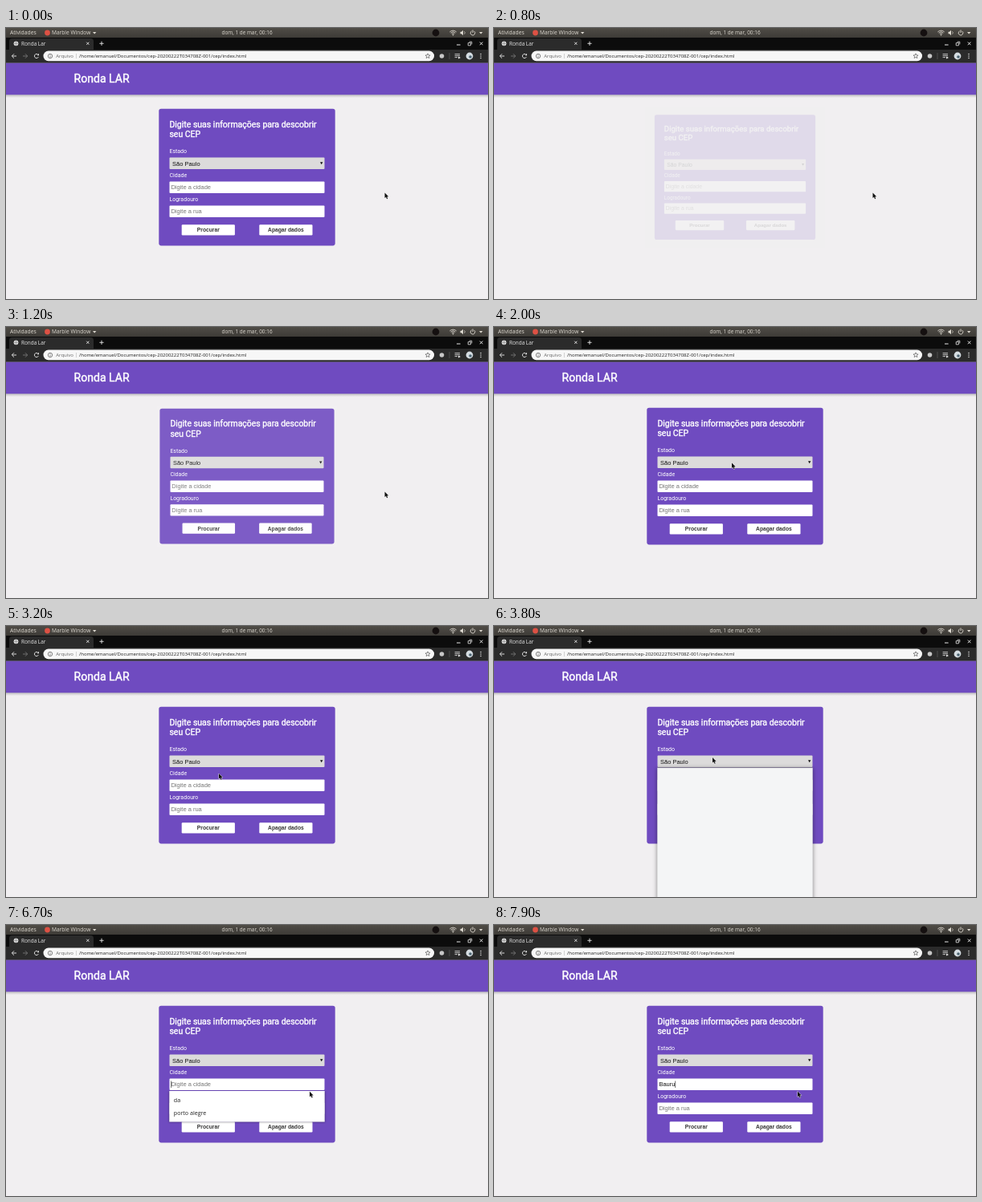
Write an HTML page with a canvas that moves like this. It is 600 by 338 pixels and loops after 8000 ms.

```html
<!DOCTYPE html>
<html lang="pt-BR">
<head>
<meta charset="utf-8">
<title>Ronda Lar</title>
<style>
html, body { margin: 0; width: 100%; height: 100%; overflow: hidden; background: #f1eff1; }
canvas { display: block; width: 600px; height: 338px; }
</style>
</head>
<body>
<canvas id="stage"></canvas>
<script>
const W = 600, H = 338, LOOP = 8000, STEP = 100;
const PURPLE = '#6f4bc0', PAGE = '#f1eff1', BAR = '#2b2b2b';
const UI = '"Open Sans", "Noto Sans", sans-serif';
const WEB = 'Roboto, sans-serif';
const FIELD = '"Liberation Sans", Arial, sans-serif';

const canvas = document.getElementById('stage');
const ctx = canvas.getContext('2d');
const dpr = window.devicePixelRatio || 1;
canvas.width = W * dpr;
canvas.height = H * dpr;

// [time, x, y] of the pointer tip
const pointerPath = [
  [1600, 471.5, 205.5], [1700, 440, 201], [1800, 378, 189], [1900, 322, 175], [2000, 296, 169.5],
  [2600, 296, 169.5], [3000, 272.5, 174],
  [3100, 272.5, 174], [3300, 257.5, 194], [3400, 273, 168],
  [3500, 273, 168], [3600, 272, 164],
  [4900, 272, 164], [5300, 378, 200],
  [5400, 378, 200], [5700, 378, 207.7]
];

const clamp = v => Math.max(0, Math.min(1, v));
const ramp = (t, from, to) => clamp((t - from) / (to - from));

// CSS "ease": cubic-bezier(.25, .1, .25, 1)
function ease(x) {
  if (x <= 0 || x >= 1) return clamp(x);
  const curve = (s, a, b) => 3 * (1 - s) * (1 - s) * s * a + 3 * (1 - s) * s * s * b + s * s * s;
  let lo = 0, hi = 1;
  for (let i = 0; i < 24; i++) {
    const mid = (lo + hi) / 2;
    if (curve(mid, 0.25, 0.25) < x) lo = mid; else hi = mid;
  }
  return curve(lo, 0.1, 1);
}

function pointerAt(t) {
  let prev = pointerPath[0];
  for (const next of pointerPath) {
    if (t <= next[0]) {
      const k = next === prev ? 0 : ramp(t, prev[0], next[0]);
      return [prev[1] + (next[1] - prev[1]) * k, prev[2] + (next[2] - prev[2]) * k];
    }
    prev = next;
  }
  return prev.slice(1);
}

function box(x, y, w, h, fill, radius = 0) {
  ctx.fillStyle = fill;
  ctx.beginPath();
  ctx.roundRect(x, y, w, h, radius);
  ctx.fill();
}

function dot(x, y, r, fill) {
  ctx.fillStyle = fill;
  ctx.beginPath();
  ctx.arc(x, y, r, 0, 7);
  ctx.fill();
}

function ring(x, y, r, color, width = 0.7, from = 0, to = Math.PI * 2) {
  ctx.strokeStyle = color;
  ctx.lineWidth = width;
  ctx.beginPath();
  ctx.arc(x, y, r, from, to);
  ctx.stroke();
}

function trace(points) {
  ctx.beginPath();
  for (let i = 0; i < points.length; i += 2) ctx.lineTo(points[i], points[i + 1]);
}

function line(color, width, ...points) {
  ctx.strokeStyle = color;
  ctx.lineWidth = width;
  trace(points);
  ctx.stroke();
}

function poly(fill, ...points) {
  ctx.fillStyle = fill;
  trace(points);
  ctx.closePath();
  ctx.fill();
}

function text(str, x, y, size, family, fill, { weight = 400, align = 'left', embolden = 0 } = {}) {
  ctx.font = `${weight} ${size}px ${family}`;
  ctx.textAlign = align;
  ctx.fillStyle = fill;
  ctx.fillText(str, x, y);
  if (embolden) {
    ctx.strokeStyle = fill;
    ctx.lineWidth = embolden;
    ctx.lineJoin = 'round';
    ctx.strokeText(str, x, y);
  }
}

function cross(x, y, r, color, width = 0.9) {
  line(color, width, x - r, y - r, x + r, y + r);
  line(color, width, x - r, y + r, x + r, y - r);
}

function drawPanel() {
  const shade = ctx.createLinearGradient(0, 0, 0, 12);
  shade.addColorStop(0, '#4f4c46');
  shade.addColorStop(1, '#3d3b37');
  box(0, 0, W, 12, shade);
  const ink = '#dfdbd2', medium = { weight: 500 };
  text('Atividades', 5, 8.4, 6.8, UI, ink, medium);
  dot(51.5, 6, 3.4, '#dd5144');
  text('Marble Window', 57, 8.4, 6.6, UI, ink, medium);
  poly(ink, 108, 5, 112.4, 5, 110.2, 7.6);
  text('dom, 1 de mar, 00:16', 300, 8.3, 6.4, UI, ink, { weight: 500, align: 'center' });
  dot(535, 6, 4.4, '#151010');
  // wifi, speaker, power, menu arrow
  for (const r of [2.2, 4, 5.8]) ring(556.5, 9, r, ink, 0.9, -Math.PI * 0.75, -Math.PI * 0.25);
  dot(556.5, 8.8, 0.8, ink);
  poly(ink, 565.5, 4.8, 567, 4.8, 569, 2.8, 569, 9.2, 567, 7.2, 565.5, 7.2);
  ring(569, 6, 2.2, ink, 0.7, -0.9, 0.9);
  ring(581, 6.2, 2.8, ink, 0.9, -1, Math.PI + 1);
  line(ink, 0.9, 581, 2.4, 581, 6);
  poly(ink, 589, 5, 593.4, 5, 591.2, 7.6);
}

function drawBrowser() {
  box(0, 12, W, 16, '#0c0c0c');
  box(4, 13, 105, 18, BAR, 3.5);
  box(0, 27, W, 16.5, BAR);
  const ink = '#e8e8e8';

  // tab
  dot(12.5, 19.3, 2.9, '#dedede');
  line('#666', 0.5, 9.7, 19.3, 15.3, 19.3);
  line('#666', 0.5, 12.5, 16.5, 12.5, 22.1);
  text('Ronda Lar', 19, 21.6, 6.4, UI, ink);
  cross(101.8, 19.3, 1.6, ink);
  line(ink, 0.9, 116.4, 19.3, 121.6, 19.3);
  line(ink, 0.9, 119, 16.7, 119, 21.9);

  // window controls
  line(ink, 1, 561, 21, 565.6, 21);
  ctx.strokeStyle = ink;
  ctx.lineWidth = 0.8;
  ctx.strokeRect(575.2, 18.6, 3.2, 3.2);
  line(ink, 0.8, 576.6, 17.2, 579.8, 17.2, 579.8, 20.4);
  cross(591.6, 19.4, 1.8, ink, 1);

  // navigation
  line(ink, 0.9, 13, 35, 7.4, 35);
  line(ink, 0.9, 10, 32.3, 7.3, 35, 10, 37.7);
  line('#777', 0.9, 21, 35, 26.6, 35);
  line('#777', 0.9, 24, 32.3, 26.7, 35, 24, 37.7);
  ring(38, 35, 2.6, ink, 0.9, 0.4, 5.4);
  poly(ink, 38.6, 34.3, 41, 34.3, 41, 31.8);

  // address field
  box(46.5, 28.6, 486.5, 12.6, '#f7f7f7', 6.3);
  ring(55, 35, 2.7, '#555', 0.7);
  line('#555', 0.7, 55, 34.5, 55, 36.6);
  dot(55, 33.4, 0.45, '#555');
  text('Arquivo', 62.3, 37.2, 6, UI, '#666');
  line('#aaa', 0.5, 87.5, 32, 87.5, 38);
  text('/home/emanuel/Documentos/cep-20200222T034708Z-001/cep/index.html', 91, 37.2, 6, UI, '#222');
  const star = [];
  for (let i = 0; i < 10; i++) {
    const r = i % 2 ? 1.4 : 3.2, a = i * Math.PI / 5 - Math.PI / 2;
    star.push(525 + r * Math.cos(a), 35 + r * Math.sin(a));
  }
  trace(star);
  ctx.closePath();
  ctx.strokeStyle = '#444';
  ctx.lineWidth = 0.6;
  ctx.stroke();

  // toolbar buttons
  dot(542.5, 35, 2.8, '#c8c8c8');
  line('#666', 0.6, 552, 31, 552, 39);
  for (const [y, end] of [[32.6, 565], [34.6, 565], [36.6, 562]]) line(ink, 0.8, 558.6, y, end, y);
  poly(ink, 563, 35.6, 566, 37, 563, 38.4);
  dot(577, 35, 4.4, '#d5dde2');
  dot(578, 36, 1.8, '#4b6472');
  for (const y of [32.6, 35, 37.4]) dot(591, y, 0.75, ink);
}

function drawHeader(titled) {
  box(0, 43.5, W, H - 43.5, PAGE);
  const shadow = ctx.createLinearGradient(0, 83, 0, 87);
  shadow.addColorStop(0, 'rgba(0,0,0,.22)');
  shadow.addColorStop(1, 'rgba(0,0,0,0)');
  box(0, 83, W, 4, shadow);
  box(0, 43.5, W, 39.7, PURPLE);
  if (titled) text('Ronda LAR', 84.6, 68.2, 14.06, WEB, '#fff', { embolden: 0.45 });
}

function drawButton(label, x) {
  box(x, 245.2, 66.2, 13.3, '#fff', 1.2);
  text(label, x + 33.1, 254.3, 6.7, FIELD, '#333', { weight: 700, align: 'center' });
}

function drawForm(typed, caret) {
  box(190.3, 100.8, 219.4, 170.6, PURPLE, 2.8);
  text('Digite suas informações para descobrir', 203.4, 123.7, 10.5, WEB, '#fff', { embolden: 0.38 });
  text('seu CEP', 203.4, 136, 10.5, WEB, '#fff', { embolden: 0.38 });

  text('Estado', 203.4, 156.4, 7.03, WEB, '#fff');
  box(203.5, 161.5, 193, 14.6, '#dcdbdb', 1);
  text('São Paulo', 207, 171.5, 7.5, FIELD, '#111');
  poly('#111', 391, 167.3, 394.4, 167.3, 392.7, 170.3);

  text('Cidade', 203.4, 186.4, 7.03, WEB, '#fff');
  box(203.5, 191.5, 193, 14.6, '#fff', 1);
  text(typed || 'Digite a cidade', 205.4, 201.3, 7.5, FIELD, typed ? '#111' : '#757575');
  if (caret) {
    const end = typed ? ctx.measureText(typed).width : 0;
    box(205.5 + end, 194.4, 0.6, 8.6, '#111');
  }

  text('Logradouro', 203.4, 216.2, 7.03, WEB, '#fff');
  box(203.5, 221.5, 193, 14.6, '#fff', 1);
  text('Digite a rua', 205.4, 231.3, 7.5, FIELD, '#757575');

  drawButton('Procurar', 218.7);
  drawButton('Apagar dados', 315.3);
}

// Fading the card is the same as veiling it with the flat page colour.
function drawCard(t, typed, caret) {
  const p = t < 800 ? 1 : ease(ramp(t, 705, 1505));
  const scale = 0.9 + 0.1 * p;
  ctx.save();
  ctx.translate(300, 186.1);
  ctx.scale(scale, scale);
  ctx.translate(-300, -186.1);
  drawForm(typed, caret);
  ctx.restore();
  if (p < 1) {
    ctx.globalAlpha = 1 - p;
    box(188, 98, 224, 176, PAGE);
    ctx.globalAlpha = 1;
  }
}

function drawPopup(y, h, fill, alpha, blur) {
  ctx.save();
  ctx.globalAlpha = alpha;
  ctx.shadowColor = 'rgba(0,0,0,.45)';
  ctx.shadowBlur = blur * dpr;
  ctx.shadowOffsetY = dpr * 0.5;
  box(203.3, y, 193.4, h, fill);
  ctx.restore();
}

function drawStates(t) {
  if (t < 3600 || t >= 4900) return;
  drawPopup(176.6, 180, '#f4f5f6', ramp(t, 3500, 3800), 5);
  line('#444', 0.5, 203.3, 176.6, 396.7, 176.6);
}

function drawSuggestions(t) {
  const alpha = Math.min(ramp(t, 5400, 5600), 1 - ramp(t, 6900, 7200));
  if (alpha <= 0) return;
  drawPopup(207, 38.6, '#fff', alpha, 2.5);
  ctx.globalAlpha = alpha;
  text('da', 208.8, 220.5, 7.1, UI, '#222', { weight: 500 });
  text('porto alegre', 208.8, 236.5, 7.1, UI, '#222', { weight: 500 });
  ctx.globalAlpha = 1;
}

function drawPointer(t) {
  const [x, y] = pointerAt(t);
  ctx.save();
  ctx.translate(x, y);
  trace([0, 0, 0, 6.6, 1.5, 5.3, 2.6, 7.8, 3.7, 7.3, 2.6, 4.9, 4.6, 4.7]);
  ctx.closePath();
  ctx.lineJoin = 'round';
  ctx.lineWidth = 0.9;
  ctx.strokeStyle = '#eee';
  ctx.stroke();
  ctx.fillStyle = '#111';
  ctx.fill();
  ctx.restore();
}

function draw(t) {
  const letters = t < 7000 ? 0 : t < 7600 ? 1 : Math.min(5, 2 + Math.floor((t - 7600) / 100));
  const caret = t >= 5500 && !(t >= 6100 && t < 6700);
  ctx.setTransform(dpr, 0, 0, dpr, 0, 0);
  drawHeader(t < 800 || t >= 900);
  drawCard(t, 'Bauru'.slice(0, letters), caret);
  drawPanel();
  drawBrowser();
  drawStates(t);
  drawSuggestions(t);
  drawPointer(t);
}

const start = performance.now();
function tick() {
  const t = (performance.now() - start) % LOOP;
  draw(Math.floor(t / STEP) * STEP);
  requestAnimationFrame(tick);
}
tick();
</script>
</body>
</html>
```
